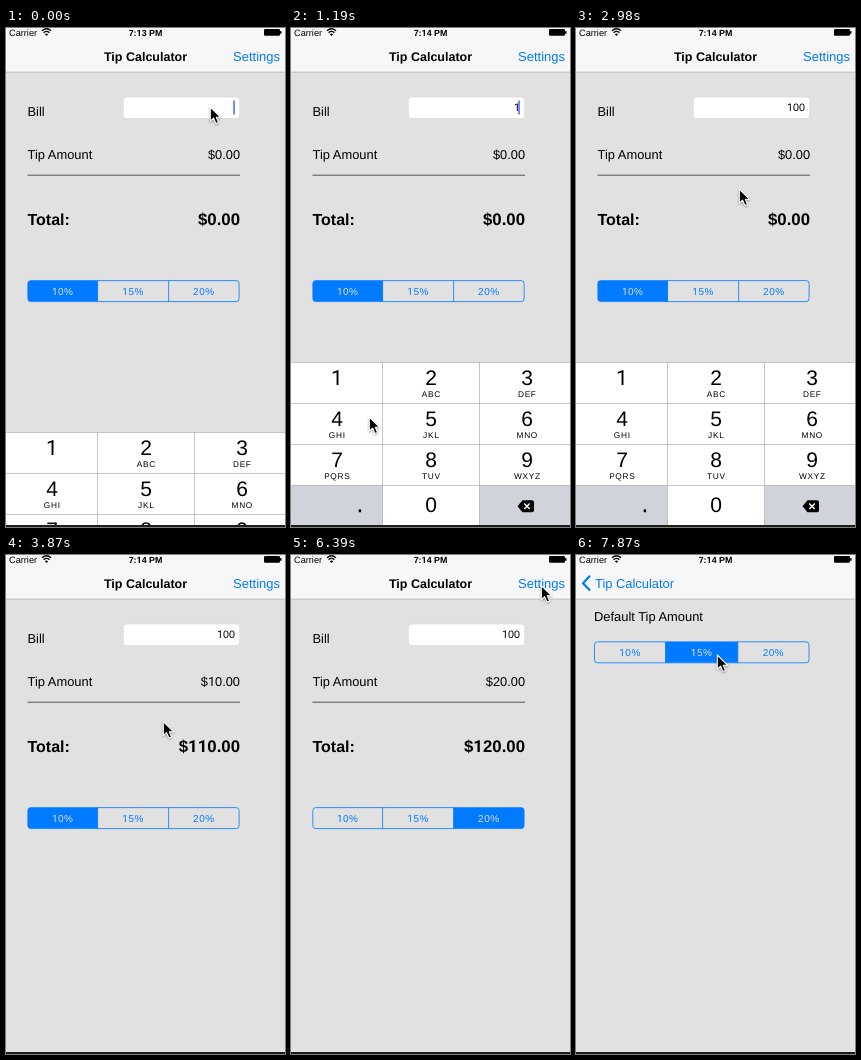
These frames come from a looping animation (279 by 499 pixels, 8000 ms). An HTML page:

```html
<!DOCTYPE html>
<html lang="en">
<head>
<meta charset="utf-8">
<title>Tip Calculator</title>
<style>
  html, body { margin: 0; width: 100%; height: 100%; overflow: hidden; background: #e1e1e1; }
  svg {
    display: block; width: 279px; height: 499px;
    font-family: "Liberation Sans", Arial, sans-serif; text-rendering: geometricPrecision;
  }
  .one { font-family: Roboto, sans-serif; }
</style>
</head>
<body>
<svg id="stage" viewBox="0 0 279 499"></svg>
<script>
const LOOP = 8000, TICK = 148.7, TICK_LEAD = 14;
const W = 279, BLUE = '#007aff', GRAY = '#e1e1e1';
const stage = document.getElementById('stage');

function add(parent, tag, attrs = {}) {
  const node = document.createElementNS('http://www.w3.org/2000/svg', tag);
  set(node, attrs);
  return parent.appendChild(node);
}
function set(node, attrs) {
  for (const name in attrs) node.setAttribute(name, attrs[name]);
}
function rect(parent, x, y, width, height, fill, more = {}) {
  return add(parent, 'rect', { x, y, width, height, fill, ...more });
}
function text(parent, x, y, size, content, more = {}) {
  const node = add(parent, 'text', { x, y, 'font-size': size, ...more });
  write(node, content);
  return node;
}
// The digit 1 takes a second font, where it has no foot.
function write(node, content) {
  if (node.textContent === content) return;
  node.textContent = '';
  for (const part of content.split(/(1)/)) {
    add(node, 'tspan', part === '1' ? { class: 'one' } : {}).textContent = part;
  }
}
const END = { 'text-anchor': 'end' };
const MID = { 'text-anchor': 'middle' };
const BOLD = { 'font-weight': 700 };

// Segmented control; returns a function that selects one segment.
function segments(parent, edges, y) {
  const [left, , , right] = edges;
  const clip = 'clip' + Math.round(y);
  const box = { x: left, y, width: right - left, height: 21, rx: 3 };
  add(add(parent, 'clipPath', { id: clip }), 'rect', box);
  const fill = rect(parent, 0, y, 0, 21, BLUE, { 'clip-path': `url(#${clip})` });
  const line = { fill: 'none', stroke: BLUE, 'stroke-width': 0.8 };
  add(parent, 'rect', { ...box, ...line });
  add(parent, 'path', { d: `M${edges[1]} ${y}v21M${edges[2]} ${y}v21`, ...line });
  const labels = ['10%', '15%', '20%'].map((label, i) =>
    text(parent, (edges[i] + edges[i + 1]) / 2, y + 14, 10, label, { ...MID, 'letter-spacing': 0.5 }));
  return chosen => {
    set(fill, { x: edges[chosen], width: edges[chosen + 1] - edges[chosen] });
    labels.forEach((label, i) => set(label, { fill: i === chosen ? GRAY : BLUE }));
  };
}

// Calculator view
const main = add(stage, 'g');
rect(main, 0, 44, W, 455, GRAY);
text(main, 21.5, 87.6, 12.9, 'Bill');
rect(main, 117.3, 69, 116.4, 21.5, '#fff', { rx: 3.5, stroke: '#d6d6d6', 'stroke-width': 0.6 });
const bill = text(main, 229, 83.2, 10.7, '', END);
const caret = rect(main, 227.3, 72.5, 1.5, 14, '#426bf2');
text(main, 21.5, 131.2, 12.9, 'Tip Amount');
const tip = text(main, 234, 130.7, 12.8, '', END);
rect(main, 21.5, 146.7, 212.5, 1, '#555');
text(main, 21.5, 197, 16, 'Total:', BOLD);
const total = text(main, 234, 197, 16.8, '', { ...END, ...BOLD });
const chooseTip = segments(main, [21.8, 91.6, 162.6, 233.1], 252.6);

// Number pad, drawn with its top edge at zero
const pad = add(stage, 'g');
const cols = [0, 91.5, 188.5, W], centers = [46, 140, 236], rowHeight = 41;
rect(pad, 0, 0, W, 165, '#fff');
rect(pad, 0, 123, cols[1], 42, '#d0d4da');
rect(pad, cols[2], 123, cols[3] - cols[2], 42, '#d0d4da');
const pressed = rect(pad, 0, 0, 0, rowHeight, '#d0d4da');
add(pad, 'path', {
  d: 'M0 .5H279M0 41.5H279M0 82.5H279M0 123.5H279M91.5 0V165M188.5 0V165',
  stroke: '#b4b6ba', 'stroke-width': 0.8, fill: 'none'
});
['', 'ABC', 'DEF', 'GHI', 'JKL', 'MNO', 'PQRS', 'TUV', 'WXYZ'].forEach((letters, i) => {
  const x = centers[i % 3], y = Math.floor(i / 3) * rowHeight;
  text(pad, x, y + 23, 21, String(i + 1), MID);
  text(pad, x + 0.3, y + 35, 8.3, letters, { ...MID, 'letter-spacing': 0.7 });
});
text(pad, 140, 150.3, 21, '0', MID);
text(pad, 69, 150, 21, '.', { ...MID, stroke: '#000', 'stroke-width': 0.4 });
add(pad, 'path', { d: 'M226.5 144.3l5-6h9.5q2 0 2 2v8q0 2-2 2h-9.5z' });
add(pad, 'path', { d: 'M233.3 141.6l5.4 5.4m0-5.4l-5.4 5.4', stroke: '#fff', 'stroke-width': 1.4 });

// Settings view
const settings = add(stage, 'g');
rect(settings, 0, 44, W, 455, GRAY);
text(settings, 18, 66, 12.9, 'Default Tip Amount');
const chooseDefault = segments(settings, [18.5, 89.5, 161.8, 233], 86.8);

// Bars
rect(stage, 0, 0, W, 44, '#f7f7f7');
rect(stage, 0, 43.7, W, 0.8, '#b2b2b2');
text(stage, 3, 7.8, 9.2, 'Carrier');
add(stage, 'path', {
  d: 'M36 2.8q4.5-4 9 0M37.6 4.7q2.9-2.6 5.8 0', fill: 'none', stroke: '#000', 'stroke-width': 1.3
});
add(stage, 'path', { d: 'M38.9 6.2q1.6-1.3 3.2 0L40.5 8z' });
const clock = text(stage, 139.5, 7.8, 8.9, '', { ...MID, ...BOLD });
rect(stage, 258, 1, 16, 6.8, '#000', { rx: 1.2 });
rect(stage, 274, 3, 1.5, 2.8, '#000', { rx: 0.6 });
const title = text(stage, 139.5, 33, 12.5, 'Tip Calculator', { ...MID, ...BOLD });
const settingsLink = text(stage, 274, 33, 13, 'Settings', { ...END, fill: BLUE });
const back = add(stage, 'g');
const backLabel = text(back, 19, 33, 12.9, 'Tip Calculator', { fill: BLUE });
add(back, 'path', { d: 'M14 20.8l-7 7.4 7 7.4', fill: 'none', stroke: BLUE, 'stroke-width': 2.2 });
rect(stage, 0, 497, W, 2, '#1c1c18');

const pointer = add(stage, 'path', {
  d: 'M-.7 0v14.2l3.3-3 2.4 5.4 2.6-1.1-2.3-5.2h4.4z',
  stroke: '#fff', 'stroke-width': 1.1, 'stroke-linejoin': 'round',
  style: 'filter:drop-shadow(0 1px 1px rgba(0,0,0,.35))'
});

// Tracks are lists of [tick, value, ...], joined by straight lines.
const pointerPath = [
  [0, 205, 79], [1, 196, 95], [5, 52, 355], [7, 52, 357], [8, 79, 389], [10, 138, 472],
  [14, 140, 473], [16, 148, 390], [19, 165, 172], [20, 164, 161], [22, 158, 166.5],
  [26, 158, 166.5], [29, 130, 260], [30, 130, 263], [32, 174, 263], [34, 199, 264],
  [38, 200, 264], [39, 204, 235], [42, 247, 48], [43, 251, 30.5], [46, 251, 30.5],
  [47, 245, 40], [50, 150, 98], [51, 142, 100], [53, 142, 100]
];
const padTop = [[0, 404], [1, 348], [2, 336], [3, 334], [20, 334], [21, 418], [22, 492], [23, 499]];
const push = [[44, 0], [45, 0.72], [46, 0.985], [47, 1]];

function sample(track, tick) {
  const next = track.findIndex(point => point[0] > tick);
  if (next === 0) return track[0].slice(1);
  if (next < 0) return track[track.length - 1].slice(1);
  const a = track[next - 1], b = track[next];
  const u = (tick - a[0]) / (b[0] - a[0]);
  return a.slice(1).map((v, i) => v + (b[i + 1] - v) * u);
}
const within = (tick, from, to) => tick >= from && tick < to;
const money = value => '$' + value.toFixed(2);
const move = (node, x, y) => set(node, { transform: `translate(${x} ${y})` });

// Column and row of the key held down, if any
function heldKey(tick) {
  if (within(tick, 6, 8)) return [0, 0];
  if (tick === 11 || tick === 13) return [1, 3];
  return null;
}

function render(time) {
  const tick = Math.floor((time + TICK_LEAD) / TICK);
  write(clock, tick < 4 ? '7:13 PM' : '7:14 PM');

  write(bill, tick < 7 ? '' : tick < 12 ? '1' : tick < 14 ? '10' : '100');
  set(caret, { opacity: within(tick, 0, 3) || within(tick, 6, 18) ? 1 : 0 });
  const choice = tick < 30 ? 0 : tick < 34 ? 1 : 2;
  const amount = tick < 21 ? 0 : 100;
  const tipAmount = amount * (10 + 5 * choice) / 100;
  write(tip, money(tipAmount));
  write(total, money(amount + tipAmount));
  chooseTip(choice);
  chooseDefault(tick < 51 ? 0 : 1);

  move(pad, 0, sample(padTop, tick)[0]);
  const key = heldKey(tick);
  set(pressed, key
    ? { x: cols[key[0]], y: key[1] * rowHeight, width: cols[key[0] + 1] - cols[key[0]] }
    : { width: 0 });

  const [p] = sample(push, tick);
  move(main, -0.3 * W * p, 0);
  move(settings, W * (1 - p), 0);
  move(title, -80 * p, 0);
  set(title, { opacity: 1 - p });
  move(settingsLink, -40 * p, 0);
  set(settingsLink, { opacity: tick === 44 ? 0.3 : 1 - p });
  move(backLabel, 80 * (1 - p), 0);
  set(back, { opacity: p });

  move(pointer, ...sample(pointerPath, tick));
}

function loop() {
  render(performance.now() % LOOP);
  requestAnimationFrame(loop);
}
loop();
</script>
</body>
</html>
```
